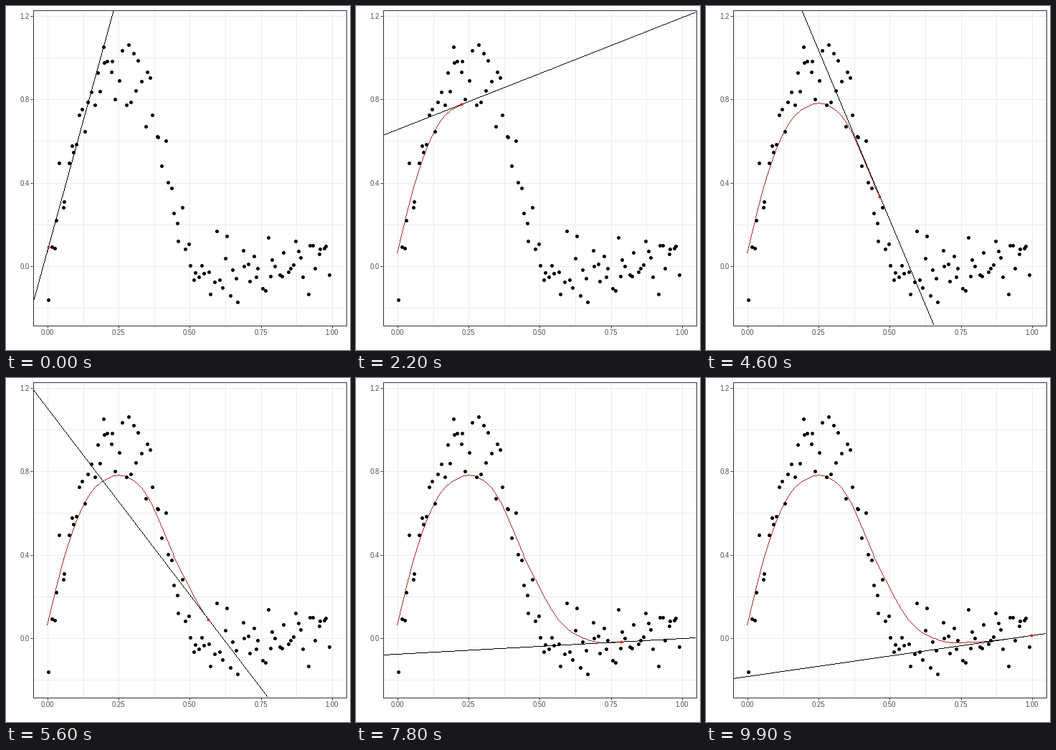
Animation of 480x480 px, one loop 10 s. Source, as a matplotlib script:

```python
import numpy as np
import matplotlib.pyplot as plt
from matplotlib.animation import FuncAnimation
from matplotlib.collections import PatchCollection, PolyCollection
from matplotlib.patches import Circle, Rectangle

SIZE = 480
FRAMES = 100
POINTS = 100
X0, XS = 57.4, 397.1      # stage x of 0, pixels per unit
Y0, YS = 362.5, 290.9     # stage y of 0, pixels per unit
LEFT, TOP, RIGHT, BOTTOM = 37.5, 5.5, 474.5, 445.5

# Local regression lines: position, fitted value, slope
KNOTS = np.array([
    (0.000, 0.063, 5.03),
    (0.058, 0.377, 4.20),
    (0.1156, 0.603, 3.04),
    (0.2261, 0.773, 0.54),
    (0.3266, 0.725, -1.633),
    (0.4673, 0.330, -3.257),
    (0.5678, 0.087, -1.789),
    (0.678, -0.0125, -0.288),
    (0.789, -0.021, 0.075),
    (0.8995, -0.008, 0.147),
    (1.000, 0.0105, 0.197),
])


def px(x):
    return X0 + XS * x


def py(y):
    return Y0 - YS * y


def smooth(x, kx, ky):
    """Cubic Hermite curve through the knots."""
    m = np.gradient(ky, kx)
    i = np.clip(np.searchsorted(kx, x) - 1, 0, len(kx) - 2)
    h = kx[i + 1] - kx[i]
    t = (x - kx[i]) / h
    return ((1 + 2 * t) * (1 - t) ** 2 * ky[i] + t * (1 - t) ** 2 * h * m[i]
            + t * t * (3 - 2 * t) * ky[i + 1] + t * t * (t - 1) * h * m[i + 1])


def cells(xs, ys):
    """Unit squares of a one-pixel line without smoothing."""
    pts = np.floor(np.column_stack([xs, ys]))
    runs = [pts[:1]]
    for a, b in zip(pts, pts[1:]):
        n = int(np.abs(b - a).max())
        t = np.arange(1, n + 1)[:, None] / max(n, 1)
        runs.append(np.floor(a + (b - a) * t + 0.5))
    corners = np.array([(0, 0), (1, 0), (1, 1), (0, 1)])
    return np.vstack(runs)[:, None] + corners


# Noisy half sine wave followed by a flat tail
rng = np.random.default_rng(7)
sx = (np.arange(POINTS) + rng.random(POINTS)) / POINTS
wave = np.where(sx < 0.5, np.sin(2 * np.pi * sx), 0)
sy = np.clip(wave + rng.normal(0, 0.1, POINTS), -0.215, 1.16)

gx = np.linspace(0, 1, 2 * FRAMES)
gy = smooth(gx, KNOTS[:, 0], KNOTS[:, 1])
slopes = smooth(gx, KNOTS[:, 0], KNOTS[:, 2])

plt.rcParams["font.family"] = "Liberation Sans"
fig = plt.figure(figsize=(SIZE / 72, SIZE / 72), dpi=72, facecolor="white")
ax = fig.add_axes([0, 0, 1, 1])
ax.set(xlim=(0, SIZE), ylim=(SIZE, 0))
ax.axis("off")


def stroke(xs, ys, color, z):
    ax.plot(xs, ys, color=color, lw=1, zorder=z, solid_capstyle="butt")


def pixel_line(color, z):
    line = PolyCollection([], facecolors=color, edgecolors="none", lw=0,
                          zorder=z)
    return ax.add_collection(line, autolim=False)


def snap(v):
    return np.floor(v) + 0.5


for x in np.arange(9) / 8:
    stroke([snap(px(x))] * 2, [TOP, BOTTOM], "#ebebeb", 1)
for y in np.arange(-1, 7) / 5:
    stroke([LEFT, RIGHT], [snap(py(y))] * 2, "#ebebeb", 1)

label = dict(fontsize=9.5, color="#4d4d4d", va="baseline")
for x in np.arange(5) / 4:
    c = snap(px(x))
    stroke([c, c], [446, 449], "#333333", 6)
    ax.text(c, 459, f"{x:.2f}", ha="center", **label)
for y in np.arange(4) * 0.4:
    c = snap(py(y))
    stroke([34, 37], [c, c], "#333333", 6)
    ax.text(32.8, c + 4.5, f"{y:.1f}", ha="right", **label)

ax.add_patch(Rectangle((LEFT, TOP), RIGHT - LEFT, BOTTOM - TOP, fill=False,
                       ec="#333333", lw=1, zorder=7))

curve = pixel_line("#a52a2a", 2)
tangent = pixel_line("black", 3)
tangent.set_clip_path(Rectangle((38, 6), 436, 439, transform=ax.transData))
marker = ax.add_patch(Circle((0, 0), 1.9, color="red", lw=0, zorder=4))
ax.add_collection(PatchCollection(
    [Circle(p, 2.5) for p in zip(snap(px(sx)), snap(py(sy)))],
    facecolors="black", edgecolors="none", lw=0, zorder=5), autolim=False)


def draw(k):
    i = 2 * k + 1
    curve.set_verts(cells(px(gx[:i + 1]), py(gy[:i + 1])))
    ends = np.array([-0.05, 1.05])
    tangent.set_verts(cells(px(ends), py(gy[i] + slopes[i] * (ends - gx[i]))))
    marker.center = snap(px(gx[i])), snap(py(gy[i]))
    return curve, tangent, marker


anim = FuncAnimation(fig, draw, frames=FRAMES, interval=100, repeat=True,
                     repeat_delay=0)
plt.show()
```
